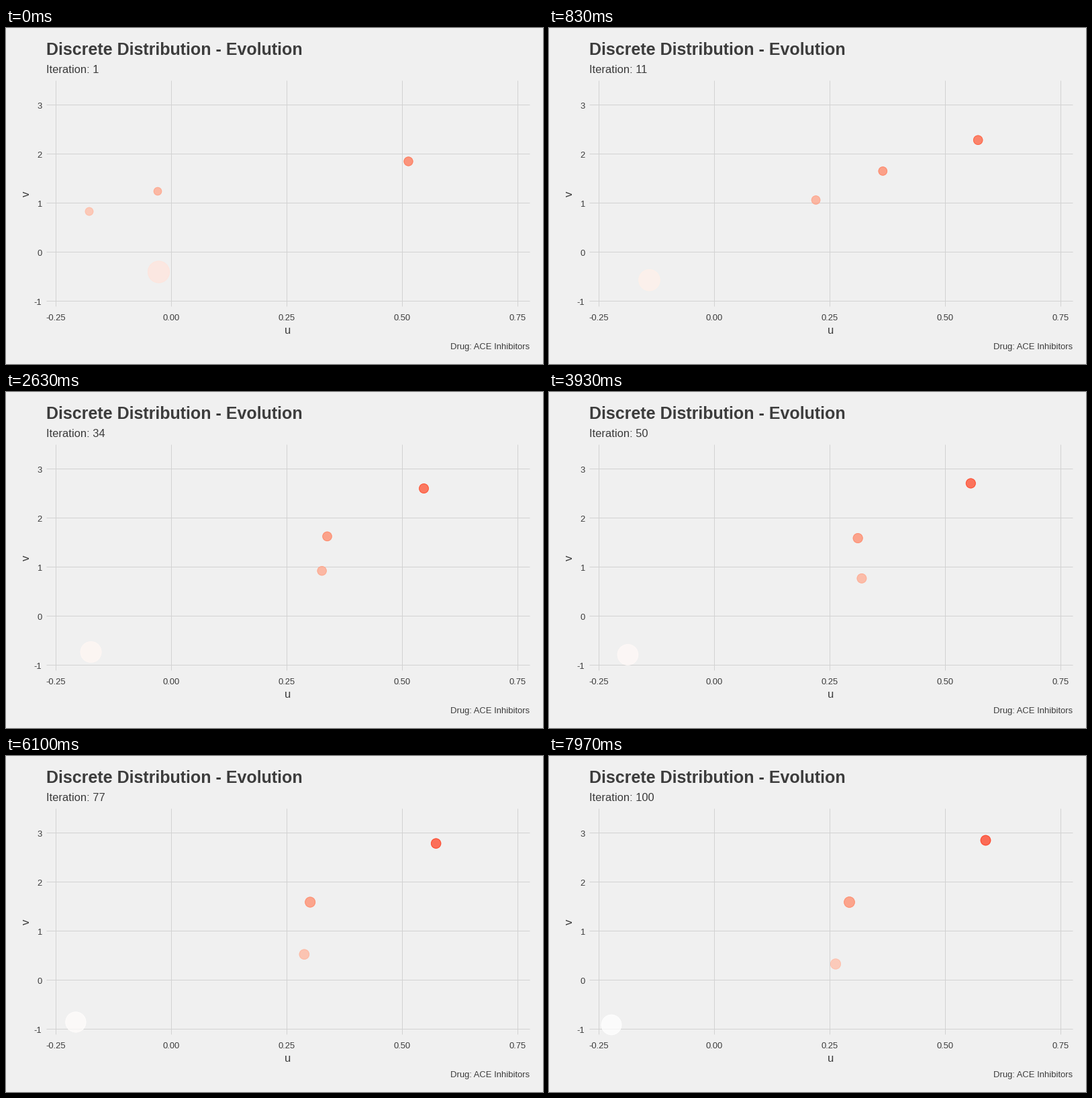
A matplotlib script that plays this animation: 800 px wide and 500 px high, repeating every 10000 ms.

```python
import numpy as np
import matplotlib.pyplot as plt
from matplotlib.animation import FuncAnimation
from matplotlib.patches import Circle

W, H, DPI = 800, 500, 100
PX = 72 / DPI
FRAMES, LAST_MOVE = 300, 239
STATES = 100
ALPHA = 0.75
INK, GRID, PAPER = "#3C3C3C", "#D2D2D2", "#F0F0F0"

# Pixel geometry of the plot: origin of the data and pixels per unit.
U0, V0, U_UNIT, V_UNIT = 246, 333, 688, 73
SCORE_MIN, SCORE_MAX = -1.13, 3.95

plt.rcParams["font.family"] = "Liberation Sans"

# Each dot leaps, settles and then drifts through a few key points.
KEY_FRAMES = np.array([0, 1.5, 12, 46, 105, 238])
DOTS = [
    dict(path=[(227.5, 363), (230, 352), (160, 369.5), (135, 383), (120, 390), (93, 400)],
         radius=(16.5, 15.3)),
    dict(path=[(124, 273), (214, 205), (344, 256), (471.5, 256), (470, 274), (427, 309.5)],
         radius=(6.3, 8)),
    dict(path=[(226, 243), (358, 156), (495, 214), (500.5, 211.5), (461.5, 217.5), (447.5, 217.5)],
         radius=(6.2, 8.3)),
    dict(path=[(599.5, 198.5), (740, 97), (654.5, 177.5), (618, 152), (626, 137), (650.5, 125.5)],
         radius=(7, 7.8)),
]


def pace(frame):
    """Time warp: logarithmic slow-down that turns into a steady drift."""
    return np.log1p(frame) + frame / 20


def white_to_red(f):
    """Blend white to red in CIE Lab and return sRGB."""
    f = min(max(f, 0), 1)
    light, a, b = 100 - 46.76 * f, 80.09 * f, 67.2 * f
    fy = (light + 16) / 116
    t = np.array([fy + a / 500, fy, fy - b / 200])
    xyz = np.where(t > 6 / 29, t ** 3, (t - 4 / 29) * 0.12842) * [0.9505, 1, 1.089]
    to_rgb = np.array([[3.2406, -1.5372, -0.4986],
                       [-0.9689, 1.8758, 0.0415],
                       [0.0557, -0.2040, 1.0570]])
    rgb = np.clip(to_rgb @ xyz, 0, 1)
    return tuple(np.where(rgb > 0.0031308, 1.055 * rgb ** (1 / 2.4) - 0.055, 12.92 * rgb))


def dot_color(x, y):
    """Shade by the sum of both data coordinates."""
    score = (x - U0) / U_UNIT + (V0 - y) / V_UNIT
    return (*white_to_red((score - SCORE_MIN) / (SCORE_MAX - SCORE_MIN)), ALPHA)


fig = plt.figure(figsize=(W / DPI, H / DPI), dpi=DPI, facecolor=PAPER)
ax = fig.add_axes([0, 0, 1, 1])
ax.set(xlim=(0, W), ylim=(H, 0))
ax.axis("off")


def label(x, y, text, px, **kw):
    return ax.text(x, y, text, fontsize=px * PX, color=INK, va="baseline", **kw)


def grid_line(xs, ys):
    ax.plot(xs, ys, color=GRID, lw=PX, solid_capstyle="butt")


for i in range(5):
    u, v = 0.25 * (i - 1), i - 1
    gx, gy = U0 + U_UNIT * u, V0 - V_UNIT * v
    grid_line([gx, gx], [78, 414])
    grid_line([60, 780], [gy, gy])
    label(gx, 435, f"{u:.2f}", 13, ha="center")
    label(53.5, gy + 6, str(v), 13, ha="right")

label(60, 40, "Discrete Distribution - Evolution", 25, weight="bold")
subtitle = label(60, 67, "", 16.5)
label(419.5, 455, "u", 16.5, ha="center")
label(35, 247, "v", 16.5, ha="center", rotation=90, rotation_mode="anchor")
label(780, 478, "Drug: ACE Inhibitors", 13, ha="right")

fills = [ax.add_patch(Circle((0, 0), 1, lw=0, zorder=3)) for _ in DOTS]
rims = [ax.add_patch(Circle((0, 0), 1, fill=False, lw=PX, zorder=3)) for _ in DOTS]


def update(frame):
    state = 1 + (frame + 1) * STATES // LAST_MOVE
    subtitle.set_text(f"Iteration: {min(state, STATES)}")
    now, keys = pace(frame), pace(KEY_FRAMES)
    for dot, fill, rim in zip(DOTS, fills, rims):
        x, y = (np.interp(now, keys, values) for values in zip(*dot["path"]))
        r = np.interp(now, keys[[0, -1]], dot["radius"])
        color = dot_color(x, y)
        fill.set(center=(x, y), radius=r, facecolor=color)
        rim.set(center=(x, y), radius=r - 0.5, edgecolor=color)
    return [subtitle, *fills, *rims]


anim = FuncAnimation(fig, update, frames=FRAMES, interval=10000 / FRAMES,
                     repeat=True, repeat_delay=0, blit=False)
plt.show()
```
